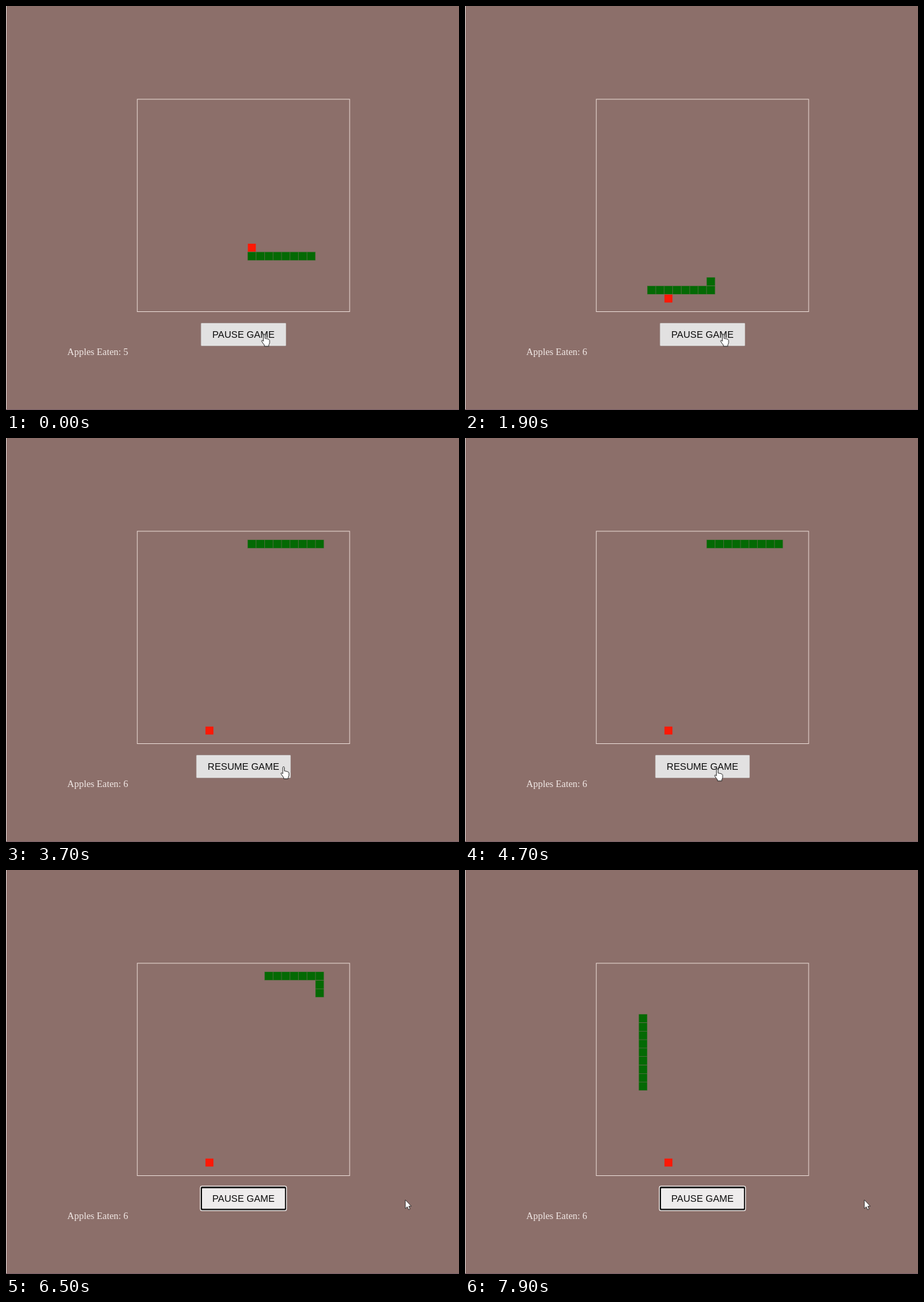
An HTML page for the animation above (8000 ms loop, 684 by 610 pixels).

```html
<!DOCTYPE html>
<html lang="en">
<head>
<meta charset="utf-8">
<title>Snake</title>
<style>
  html, body { margin: 0; width: 100%; height: 100%; overflow: hidden; background: #8c6f6a; }
  svg { display: block; width: 684px; height: 610px; }
  #label { font: 14.4px "Liberation Sans", Arial, sans-serif; text-anchor: middle; fill: #0c0c0c; }
  #score { font: 14.4px "Liberation Serif", "Times New Roman", serif; fill: #f1e8e5; }
</style>
</head>
<body>
<svg viewBox="0 0 684 610">
  <rect width="684" height="610" fill="#8c6f6a"/>
  <rect width="1" height="610" fill="#d9d0ce"/>
  <rect y="609" width="684" height="1" fill="#7c626a"/>
  <rect x="198.2" y="140.8" width="320.7" height="320.7" fill="none" stroke="#e6d6d1"/>

  <path id="glow" fill="#2a6c22" fill-opacity=".55"/>
  <path id="body" fill="#046904"/>
  <path id="apple" fill="#fd1806"/>

  <g id="ring">
    <rect x="292.8" y="476.8" width="131.4" height="38.2" rx="3" fill="#f4efed"/>
    <rect x="294" y="478" width="129" height="35.8" rx="2" fill="#151515"/>
  </g>
  <rect id="shadow" y="478.6" height="35" rx="1" fill="#a8a09e"/>
  <rect id="button" rx="1"/>
  <text id="label" x="358.6" y="500.6"></text>
  <text id="score" x="92.6" y="527"></text>

  <g id="cursor" stroke="#1c1c1c" stroke-linejoin="round" fill="#fff">
    <path id="hand" stroke-width=".9" d="M-1.3.8C-1.3-.9 1.2-.9 1.2.8V6L3.4 6.3 5.4 6.8 7.2 7.6Q8 8 8 9.4V12.4Q7.8 14.4 6.8 15.6V17.8H.2V16Q-2.2 13.2-3.8 10.4C-4.6 8.8-2.8 8.2-1.3 10.2Z"/>
    <path id="arrow" stroke-width=".8" d="M0 0V13.2L3 10.5 4.9 15 7.1 14 5.2 9.7H9Z"/>
  </g>
</svg>
<script>
const LOOP = 8000, FRAME = 100, GRID = 25, CELL = 12.8, SIZE = 12;
const ORIGIN = { x: 198.8, y: 141.3 };
const STEPS_PER_MS = 0.0238;
const PAUSE_STEP = 76, RESUME_AT = 5353, EAT_STEP = 33, RING_AT = 6400;
const TURNS = "L11 U13 R4 D17 L13 D4 R46 D2 L3 U3 L13 D14";
const DIRECTIONS = { L: [-1, 0], R: [1, 0], U: [0, -1], D: [0, 1] };
const START = [20, 18], START_LENGTH = 8;

// Pointer keyframes: time, x, y
const POINTER = [
  [3600, 390, 496], [4000, 577, 501], [4100, 577, 501], [4400, 381, 500],
  [5400, 381, 500], [5900, 603, 498]
];

const $ = id => document.getElementById(id);
const set = (id, attributes) => {
  for (const name in attributes) $(id).setAttribute(name, attributes[name]);
};
const show = (id, visible) => set(id, { visibility: visible ? "visible" : "hidden" });

// Every cell the head visits; the board wraps at its edges.
const trail = [START];
for (const turn of TURNS.split(" ")) {
  const [dx, dy] = DIRECTIONS[turn[0]];
  for (let n = +turn.slice(1); n > 0; n--) {
    const [x, y] = trail[trail.length - 1];
    trail.push([(x + dx + GRID) % GRID, (y + dy + GRID) % GRID]);
  }
}

function square([column, row], grow = 0) {
  const x = ORIGIN.x + column * CELL - grow, y = ORIGIN.y + row * CELL - grow;
  const side = SIZE + 2 * grow;
  return `M${x} ${y}h${side}v${side}h${-side}z`;
}

function stepAt(t) {
  if (t < RESUME_AT) return Math.min(PAUSE_STEP, Math.floor(0.6 + t * STEPS_PER_MS));
  return PAUSE_STEP + Math.floor((t - RESUME_AT) * STEPS_PER_MS);
}

function pointerAt(t) {
  const next = POINTER.findIndex(key => key[0] > t);
  if (next < 0) return POINTER[POINTER.length - 1].slice(1);
  if (next === 0) return POINTER[0].slice(1);
  const [t0, x0, y0] = POINTER[next - 1], [t1, x1, y1] = POINTER[next];
  const p = (t - t0) / (t1 - t0), ease = p * p * (3 - 2 * p);
  return [x0 + (x1 - x0) * ease, y0 + (y1 - y0) * ease];
}

function drawSnake(step) {
  const eaten = step >= EAT_STEP;
  const length = START_LENGTH + (step > EAT_STEP ? 1 : 0);
  const head = START_LENGTH - 1 + step;
  const cells = trail.slice(head - length + 1, head + 1);
  set("glow", { d: cells.map(cell => square(cell, 0.6)).join("") });
  set("body", { d: cells.map(cell => square(cell)).join("") });
  set("apple", { d: square(eaten ? [8, 23] : [13, 17]) });
  $("score").textContent = "Apples Eaten: " + (eaten ? 6 : 5);
}

function drawButton(paused, hover, focused) {
  const width = paused ? 142 : 128, left = 358.6 - width / 2;
  const inset = focused ? 1.4 : 0;
  set("shadow", { x: left - 0.3, width: width + 0.6 });
  show("shadow", !focused);
  show("ring", focused);
  set("button", {
    x: left + inset, y: 479 + inset,
    width: width - 2 * inset, height: 34 - 2 * inset,
    fill: hover ? "#e2e1e1" : "#eeecec"
  });
  $("label").textContent = paused ? "RESUME GAME" : "PAUSE GAME";
}

function draw(t) {
  const step = stepAt(t);
  const paused = step === PAUSE_STEP && t < RESUME_AT;
  const [x, y] = pointerAt(t);
  const hover = Math.abs(x - 358.6) < (paused ? 71 : 64);
  drawSnake(step);
  drawButton(paused, hover, t >= RING_AT);
  set("cursor", { transform: `translate(${x} ${y})` });
  show("hand", hover);
  show("arrow", !hover);
}

const start = performance.now();
function tick() {
  const t = (performance.now() - start) % LOOP;
  draw(Math.floor(t / FRAME) * FRAME);
  requestAnimationFrame(tick);
}
tick();
</script>
</body>
</html>
```
